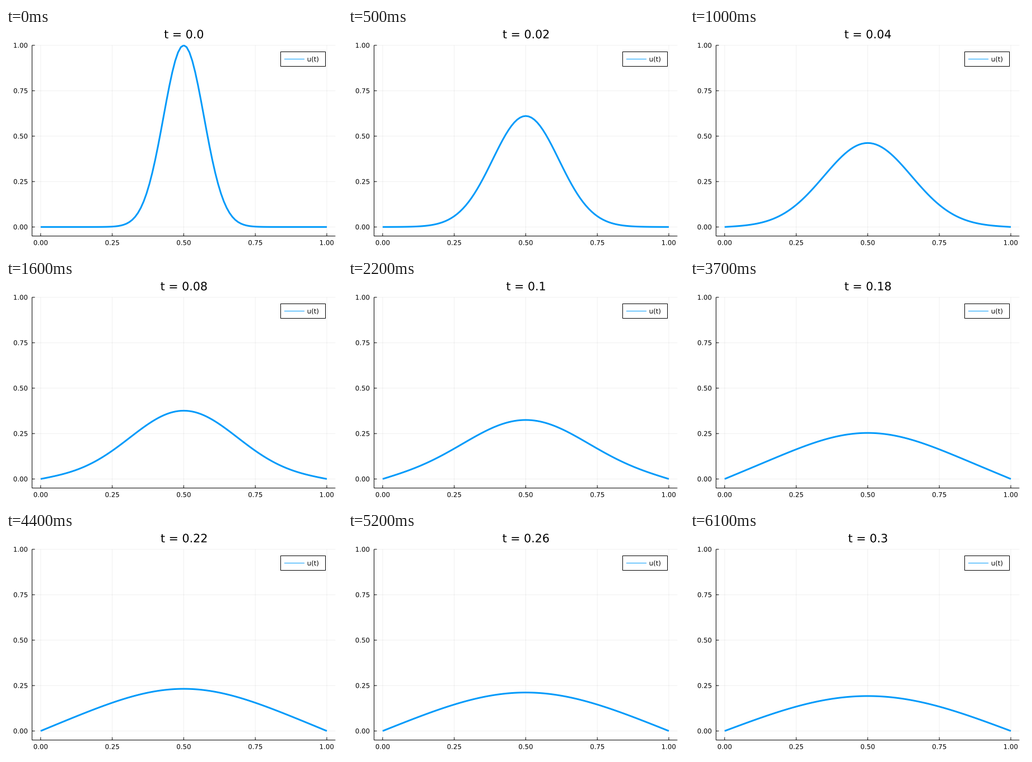
These frames come from a looping animation (600x400 px, 6.2 s). A matplotlib script:

```python
import numpy as np
import matplotlib.pyplot as plt
from matplotlib.animation import FuncAnimation
from matplotlib.patches import PathPatch, Rectangle
from matplotlib.textpath import TextPath
from matplotlib.transforms import Affine2D

W, H, DPI = 600, 400, 100
FRAMES, INTERVAL = 62, 100
BLUE = "#009afa"
LEFT, RIGHT, TOP, BOTTOM = 46.5, 588.2, 30.9, 371.5
SMALL, LARGE = 11.75, 20.6
DIFFUSIVITY, DT, LEAD = 0.2, 0.005, 0.001

plt.rcParams["font.family"] = "DejaVu Sans"
plt.rcParams["path.snap"] = False


def pt(px):
    return px * 72 / DPI


def px_x(x):
    return 61.9 + 511 * x


def px_y(y):
    return 355.3 - 324.4 * y


fig = plt.figure(figsize=(W / DPI, H / DPI), dpi=DPI, facecolor="white")
ax = fig.add_axes([0, 0, 1, 1])
ax.set_xlim(0, W)
ax.set_ylim(H, 0)
ax.axis("off")


def stroke(xs, ys, color="black", width=1.0, **kw):
    kw.setdefault("solid_capstyle", "butt")
    return ax.plot(xs, ys, color=color, lw=pt(width), **kw)[0]


def outline(x, y, text, size=SMALL, align=0.5):
    """Glyph outlines on baseline y; align 0, 0.5, 1 = left, centre, right."""
    path = TextPath((0, 0), text, size=size)
    box = path.get_extents()
    shift = x - box.x0 - align * box.width
    return Affine2D().scale(1, -1).translate(shift, y).transform_path(path)


def label(*args, **kw):
    patch = PathPatch(outline(*args, **kw), fc="black", lw=0, zorder=6)
    return ax.add_patch(patch)


# Grid, ticks and tick labels
for v in (0, 0.25, 0.5, 0.75, 1):
    x, y = px_x(v), px_y(v)
    stroke([x, x], [TOP, BOTTOM], alpha=0.06, zorder=1)
    stroke([LEFT, RIGHT], [y, y], alpha=0.06, zorder=1)
    stroke([x, x], [BOTTOM, BOTTOM - 5], zorder=2)
    stroke([LEFT, LEFT + 5], [y, y], zorder=2)
    label(x, 387.5, f"{v:.2f}")
    label(38.2, y + 4.3, f"{v:.2f}", align=1)

stroke([LEFT, LEFT, RIGHT], [TOP, BOTTOM, BOTTOM], zorder=2,
       solid_joinstyle="miter")

# Legend
ax.add_patch(Rectangle((490.5, 42.5), 80, 26, fc="white", ec="black",
                       lw=pt(1), zorder=4))
stroke([497, 533], [55.5, 55.5], BLUE, 1, zorder=5)
label(538.6, 59.7, "u(t)", align=0)

title = label(317.4, 18.4, "t", LARGE)
curve = stroke([], [], BLUE, 3, zorder=3, solid_joinstyle="round")
clip = Rectangle((LEFT, TOP - 0.9), RIGHT - LEFT, BOTTOM - TOP + 0.9,
                 transform=ax.transData)
curve.set_clip_path(clip)

# Sine series of a Gaussian bump with fixed zero ends
grid = np.linspace(0, 1, 101)
modes = np.arange(1, 40, 2)
freq = np.pi * modes
amps = 2 * np.sqrt(0.01 * np.pi) * np.exp(-0.0025 * freq**2) * np.sin(freq / 2)
basis = np.sin(np.outer(grid, freq))


def heat(t):
    return basis @ (amps * np.exp(-DIFFUSIVITY * freq**2 * t))


def draw(i):
    step = max(i - 1, 0)
    t = step * 5 / 1000
    elapsed = step * DT + (LEAD if i else 0)
    curve.set_data(px_x(grid), px_y(heat(elapsed)))
    text = f"t = {round(t * 100) / 100}"
    title.set_path(outline(317.4, 18.4, text, LARGE))
    return curve, title


anim = FuncAnimation(fig, draw, frames=FRAMES, interval=INTERVAL,
                     repeat=True, repeat_delay=0)
plt.show()
```
